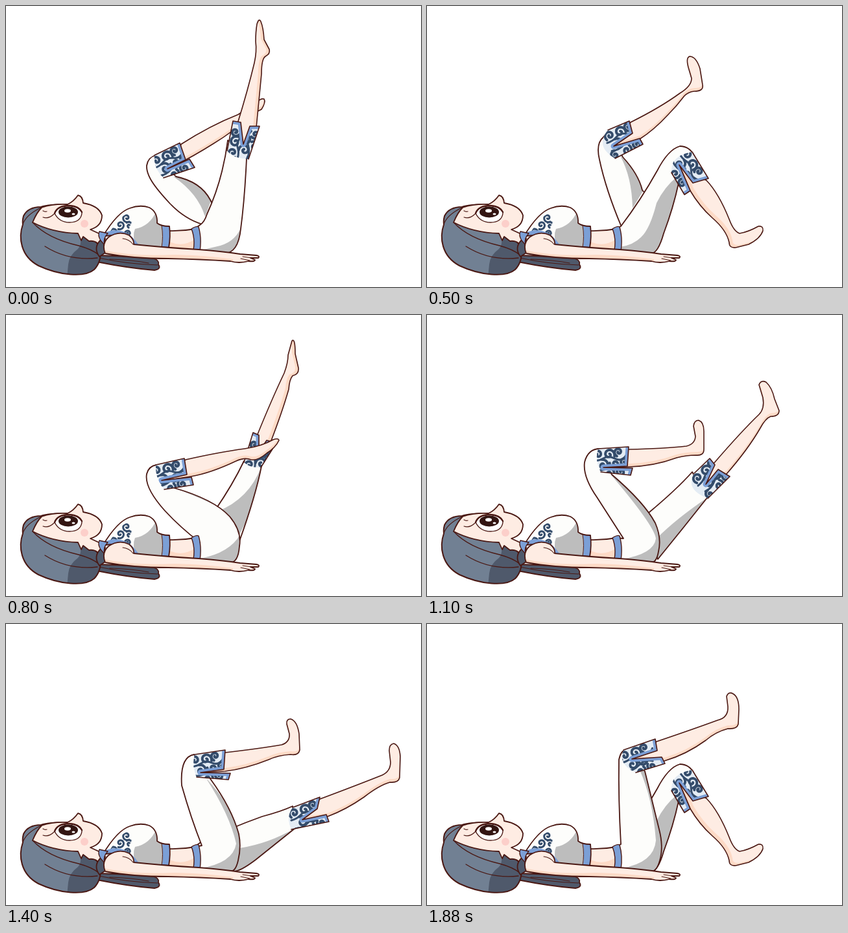
Recreate the animation shown at these times as an HTML page. Size 640 px wide and 435 px high, loop 2 s.

```html
<!DOCTYPE html>
<html lang="en">
<head>
<meta charset="utf-8">
<title>Leg exercise</title>
<style>
html, body { margin: 0; width: 100%; height: 100%; overflow: hidden; background: #fff; }
svg { display: block; width: 100vw; height: 100vh; }
</style>
</head>
<body>
<svg id="stage" viewBox="0 0 640 435" stroke-linecap="round" stroke-linejoin="round"></svg>
<script>
const INK = '#4a1813', SKIN = '#feece3', SKIN_SHADE = '#fddac6', CLOTH = '#fdfdfb', GREY = '#bdbdbd',
  TRIM = '#7b9fd6', NAVY = '#344c6b', PALE = '#e4ecf4', HAIR = '#718093', HAIR_DARK = '#4f596b';

let clipCount = 0;
const fill = (d, color) => `<path d="${d}" fill="${color}"/>`;
const line = (d, width = 1.8, color = INK) => `<path d="${d}" fill="none" stroke="${color}" stroke-width="${width}"/>`;
const shape = (d, color, width) => fill(d, color) + line(d, width);
const clipped = (d, content) => {
  const id = 'clip' + clipCount++;
  return `<clipPath id="${id}"><path d="${d}"/></clipPath><g clip-path="url(#${id})">${content}</g>`;
};

function spiral(x, y, radius, start, turns = 1.35, dir = 1) {
  let d = '';
  for (let i = 0; i <= 20; i++) {
    const k = i / 20, a = start + dir * k * turns * 2 * Math.PI, r = radius * (1 - 0.85 * k);
    d += `${i ? 'L' : 'M'}${(x + r * Math.cos(a)).toFixed(1)} ${(y + r * Math.sin(a)).toFixed(1)}`;
  }
  return d;
}

const swirls = [
  [8, 9, 8, 2.5, 1], [25, 10, 9, 0.4, -1], [40, 7, 7, 2, 1], [15, 26, 9, 4.5, 1],
  [33, 25, 8, 3.4, -1], [48, 22, 7, 1, 1], [4, 40, 7, 5, -1], [24, 40, 8, 5.5, 1], [42, 38, 7, 4, -1]
].map(([x, y, r, start, dir]) => line(spiral(x, y, r, start, 1.2, dir), 3.9, NAVY)).join('')
  + line('M0 18Q10 19 17 15T34 17T52 12M2 32Q12 36 24 30T46 31', 3, NAVY);

// Cuff points: knee, outer edge, slit and flap, back to the knee; bulge closes it around the knee.
function cuff(points, bulge) {
  const p = points.split(' ').map(s => s.split(',').map(Number));
  const [[ax, ay], [bx, by]] = p;
  const open = 'M' + p.map(q => q.join(' ')).join('L');
  const closed = `${open}Q${bulge} ${ax} ${ay}Z`;
  const hem = 'M' + p.slice(1, 6).map(q => q.join(' ')).join('L');
  const angle = Math.atan2(by - ay, bx - ax) * 180 / Math.PI;
  return clipped(closed, fill(closed, PALE)
    + `<g transform="translate(${ax} ${ay}) rotate(${angle}) translate(-9 0)">${swirls}</g>`
    + line(hem, 9, TRIM)) + line(open, 1.6);
}

function leg({ thigh, shade, shin, points, bulge, light = '0 -5' }) {
  return fill(thigh, CLOTH) + clipped(thigh, fill(shade, GREY)) + line(thigh)
    + clipped(shin, fill(shin, SKIN_SHADE) + `<g transform="translate(${light})">${fill(shin, SKIN)}</g>`)
    + line(shin, 1.6) + cuff(points, bulge);
}

const straight = shade => leg({
  shade,
  thigh: 'M291 345L300 338Q345 316 395 298Q425 290 442 282L446 316Q410 345 385 365Q360 384 350 383L292 378Z',
  shin: 'M484 271Q540 250 580 234Q593 228 593 214L591 196Q591 186 598 185Q607 188 608 205L607 238Q605 246 592 245Q575 250 552 268Q525 287 496 298L458 303Z',
  points: '442,284 484,268 480,286 457,303 494,295 498,306 440,318', bulge: '431 300'
});
const bent = leg({
  thigh: 'M291 345L299 341Q330 300 355 255Q372 222 390 217Q405 217 412 232L388 274Q380 312 365 352Q356 384 345 383L292 378Z',
  shade: 'M386 264Q366 280 354 305Q344 345 330 358Q318 370 298 373L300 386H346Q360 376 366 348Q382 310 390 270Z',
  shin: 'M389 246L406 286Q420 310 440 328Q462 347 466 366Q466 375 476 374L496 369Q514 360 518 348Q519 340 511 341Q495 350 482 352Q473 349 466 330Q450 290 431 270Z',
  points: '409,226 434,267 410,274 389,246 406,286 397,292 377,258', bulge: '375 231', light: '5 -4'
});

// Each pose: how long it holds, then far leg and near leg.
const poses = [
  [200, leg({
    thigh: 'M303 338Q276 330 253 306C228 279 216 262 217 247Q219 234 231 231L262 264Q300 272 315 300L330 330Z',
    shade: 'M258 264Q300 270 317 299L307 326Q296 290 258 264Z',
    shin: 'M270 214Q315 185 358 168L386 150Q393 142 398 144Q401 149 394 160L384 165Q350 195 320 213Q290 232 262 246Z',
    points: '229,231 268,212 277,238 249,252 283,237 291,250 243,266', bulge: '227 252'
  }) + leg({
    thigh: 'M291 345L299 339Q306 335 310 322Q334 270 342 208L371 236Q368 300 362 345Q358 384 335 383L292 378Z',
    shade: 'M363 342Q352 368 322 373L300 378L340 386Q362 380 363 342Z',
    shin: 'M357 182Q373 130 383 88Q387 70 385 55Q385 40 387 28Q390 18 393 24Q397 34 398 52L406 67Q408 74 400 78Q394 82 394 105L386 188L366 214Z',
    points: '341,224 350,178 362,180 366,214 376,186 391,186 374,237', bulge: '350 236', light: '-5 -1'
  })],
  [300, leg({
    thigh: 'M300 342Q268 290 248 255Q238 232 246 219Q250 210 260 208L286 244Q324 270 345 319L340 335Z',
    shade: 'M280 243Q325 268 347 318L332 324Q312 280 280 243Z',
    shin: 'M302 194Q345 178 381 156Q388 148 380 133Q372 121 374 115Q379 110 386 116Q398 122 399 142L407 156Q408 165 396 164Q385 164 370 176Q335 203 306 219L276 234Z',
    points: '258,208 299,189 306,212 266,235 313,217 319,229 272,245', bulge: '256 230'
  }) + straight('M446 316Q410 338 375 352Q345 366 325 372L300 377L352 386Q375 378 446 317Z')],
  [300, leg({
    thigh: 'M300 342Q276 285 266 238Q260 213 272 203L280 193L302 234Q326 260 332 285L345 300L310 340Z',
    shade: 'M298 232Q325 256 334 285L317 313Q316 265 298 232Z',
    shin: 'M314 180Q360 157 390 135Q408 124 408 112L403 95Q399 80 405 78Q415 78 421 97L425 122Q427 132 412 132Q403 133 397 139Q385 155 372 168Q350 192 328 206L289 217Z',
    points: '279,192 312,178 317,197 288,217 328,205 333,214 290,236', bulge: '258 218'
  }) + bent],
  [300, leg({
    thigh: 'M322 303Q350 262 367 226L394 234Q385 280 360 350L330 330Z',
    shade: 'M394 234Q375 285 326 304L350 360L375 310Z',
    shin: 'M387 187Q410 130 429 90Q435 74 435 62L441 40Q446 35 446 60L451 82Q452 92 442 94Q437 100 436 115Q426 150 408 197L392 212Z',
    points: '367,228 381,182 390,186 390,212 402,194 417,198 393,236', bulge: '376 237', light: '-5 -2'
  }) + leg({
    thigh: 'M291 346L299 352Q270 330 245 303Q213 267 217 246Q220 234 232 232L260 268Q320 285 345 312Q364 335 360 358Q358 384 345 383L292 378Z',
    shade: 'M361 340Q345 368 300 377L347 386Q366 376 361 340ZM255 266Q300 275 322 294Q285 277 255 266Z',
    shin: 'M277 224Q330 212 368 207Q395 203 412 193Q420 190 421 194Q416 205 402 214Q388 226 378 224Q368 220 355 226Q315 245 285 250L240 257Z',
    points: '231,232 275,222 279,247 240,256 286,251 289,263 244,270', bulge: '230 254'
  })],
  [300, leg({
    thigh: 'M342 306Q385 270 409 243L432 283Q395 330 356 378L340 340Z',
    shade: 'M432 283Q385 315 356 344L352 382Q395 335 432 283Z',
    shin: 'M442 230Q485 180 512 154Q521 145 518 128L512 108Q515 100 523 104Q532 112 536 130L543 148Q543 157 530 157Q522 160 514 175Q495 208 462 246L431 262Z',
    points: '412,245 436,222 444,232 430,262 449,239 467,250 433,284', bulge: '397 270'
  }) + leg({
    thigh: 'M291 345L303 346Q285 318 262 282Q240 250 243 228Q248 207 267 207L285 247Q335 290 352 322Q362 345 357 366Q354 384 345 383L292 378Z',
    shade: 'M280 243Q335 286 354 322Q364 345 358 368Q354 386 345 386L300 378Q350 370 353 346Q350 325 280 243Z',
    shin: 'M311 208Q365 207 400 203Q413 200 414 188L411 172Q412 163 419 163Q427 166 427 180L427 208Q427 218 415 217Q400 217 385 221Q350 234 312 235L272 236Z',
    points: '264,207 311,204 309,234 272,236 317,237 314,248 268,243', bulge: '258 225'
  })],
  [300, straight('M446 316Q405 340 360 347L300 377L352 386Q375 378 446 317Z') + leg({
    thigh: 'M291 345L302 343Q285 300 271 250Q268 206 290 202L316 241Q348 285 359 325Q363 345 358 366Q354 384 345 383L292 378Z',
    shade: 'M308 238Q348 281 361 325Q365 350 358 368Q354 386 345 386L300 378Q350 370 355 340Q345 295 308 238Z',
    shin: 'M338 199Q390 193 425 187Q438 183 437 170L433 155Q432 147 439 147Q449 150 452 170L453 195Q451 204 439 202Q420 203 405 210Q370 224 338 228L300 230Z',
    points: '291,202 338,195 336,225 300,230 346,231 343,241 294,237', bulge: '286 220'
  })],
  [300, bent + leg({
    thigh: 'M291 345L299 341Q295 270 296 210Q299 196 306 195L336 228Q345 265 358 318Q365 345 359 366Q354 384 345 383L292 378Z',
    shade: 'M328 226L338 226Q347 265 360 318Q367 345 360 368Q354 386 345 386L300 378Q350 370 353 335Q348 270 328 226Z',
    shin: 'M354 182Q410 163 448 149Q465 145 464 128L462 112Q465 104 472 108Q481 113 481 132L480 155Q478 163 464 162Q445 167 430 180Q400 202 366 212L316 209Z',
    points: '303,195 352,178 355,196 316,209 362,206 367,216 322,230', bulge: '294 218'
  })]
];

function head() {
  const hair = 'M96 307Q66 307 54 311Q34 311 27 325Q25 333 26 338C19 358 22 387 50 402C82 417 121 421 136 408Q147 397 146 376L128 348L60 325Z';
  const face = 'M41 335Q47 320 55 312Q72 306 95 307Q104 303 111 293Q118 294 119 305Q143 309 148 324Q148 341 130 346L143 352L153 360L148 378Q142 362 128 364L119 357L116 363L111 352Q72 351 41 335Z';
  return shape('M140 386Q190 387 228 391Q237 394 235 400Q240 407 229 409Q190 406 140 396Z', HAIR_DARK)
    + line('M143 390Q190 400 234 401M160 392Q195 393 220 398', 1.2)
    + fill(hair, HAIR)
    + clipped(hair, fill('M112 350Q119 366 111 376Q97 386 96 400L94 420H150V350Z', HAIR_DARK))
    + line(hair, 2)
    + line('M26 338Q30 324 54 312M41 335Q64 360 112 371Q134 377 144 386M60 372Q96 395 141 390', 1.3)
    + shape(face, SKIN)
    + shape('M146 362Q158 370 153 382L144 388Q134 374 146 362Z', HAIR_DARK)
    + '<ellipse cx="121" cy="337" rx="6" ry="6" fill="#fccfca"/>'
    + shape('M75 321Q79 309 98 309Q116 310 117 321Q115 335 98 335Q82 335 75 321Z', '#fff', 1.4)
    + '<ellipse cx="96" cy="319" rx="15" ry="8.5" fill="#321512"/>'
    + '<ellipse cx="95" cy="317" rx="5" ry="2.8" fill="#fff"/><ellipse cx="104" cy="322" rx="2.5" ry="1.5" fill="#fff"/>'
    + line('M75 321Q79 309 98 309Q112 310 117 319', 2.4)
    + line('M74 322Q66 330 57 327M57 317Q60 319 63 318', 1.2);
}

function torso() {
  const blouse = 'M149 357Q172 319 191 313Q207 307 221 312Q234 319 233 336Q239 341 252 341Q254 357 251 374L200 371Q175 350 149 357Z';
  const motif = [[186, 328, 7, 1, 1], [176, 339, 7, 2, -1], [190, 340, 6, 4, 1], [165, 350, 6, 0, -1], [188, 352, 5, 3, 1]]
    .map(([x, y, r, start, dir]) => line(spiral(x, y, r, start, 1.2, dir), 3, NAVY)).join('');
  return shape('M248 348Q270 349 292 345L296 380L248 378Z', SKIN)
    + fill('M252 365Q272 374 292 361L294 379L250 377Z', SKIN_SHADE)
    + fill(blouse, CLOTH)
    + clipped(blouse, fill('M232 317Q222 341 199 345Q194 356 201 373H244V336Z', GREY)
      + clipped('M160 350L173 330L195 316Q197 331 190 344L197 360Z', motif)
      + line('M246 338Q249 356 246 378', 11, TRIM) + line('M240 340Q243 356 240 374', 1)
      + line('M149 357Q180 342 200 371', 9, TRIM))
    + line(blouse)
    + shape('M144 349L157 352Q149 360 152 370L146 363Q141 355 144 349Z', TRIM, 1.3);
}

function waistAndArm() {
  const arm = 'M153 383Q147 368 158 358Q174 347 190 355Q198 362 197 369Q245 374 297 377Q335 380 361 384L386 386Q392 387 389 390L377 390L384 393Q384 396 374 395Q359 399 346 395Q300 392 250 391Q195 391 153 383Z';
  return shape('M286 345Q294 340 297 342Q302 359 299 380L289 378Q292 360 286 345Z', TRIM, 1.4)
    + fill(arm, SKIN)
    + clipped(arm, fill('M150 378Q195 388 260 385Q310 386 350 392L350 400H150Z', SKIN_SHADE))
    + line(arm) + line('M365 388L379 390M362 391L376 394M180 360Q190 361 196 369', 1.1);
}

const stage = document.getElementById('stage');
stage.innerHTML = head() + torso()
  + poses.map(([, legs]) => `<g class="pose">${legs}</g>`).join('') + waistAndArm();

const groups = [...stage.querySelectorAll('.pose')];
const loop = poses.reduce((sum, [hold]) => sum + hold, 0);

function render(time) {
  let rest = time % loop, current = 0;
  while (rest >= poses[current][0]) rest -= poses[current++][0];
  // Opacity rather than display, so clip paths shared between poses stay usable.
  groups.forEach((g, i) => g.setAttribute('opacity', i === current ? 1 : 0));
}

const startTime = performance.now();
function tick() {
  render(performance.now() - startTime);
  requestAnimationFrame(tick);
}
tick();
</script>
</body>
</html>
```
